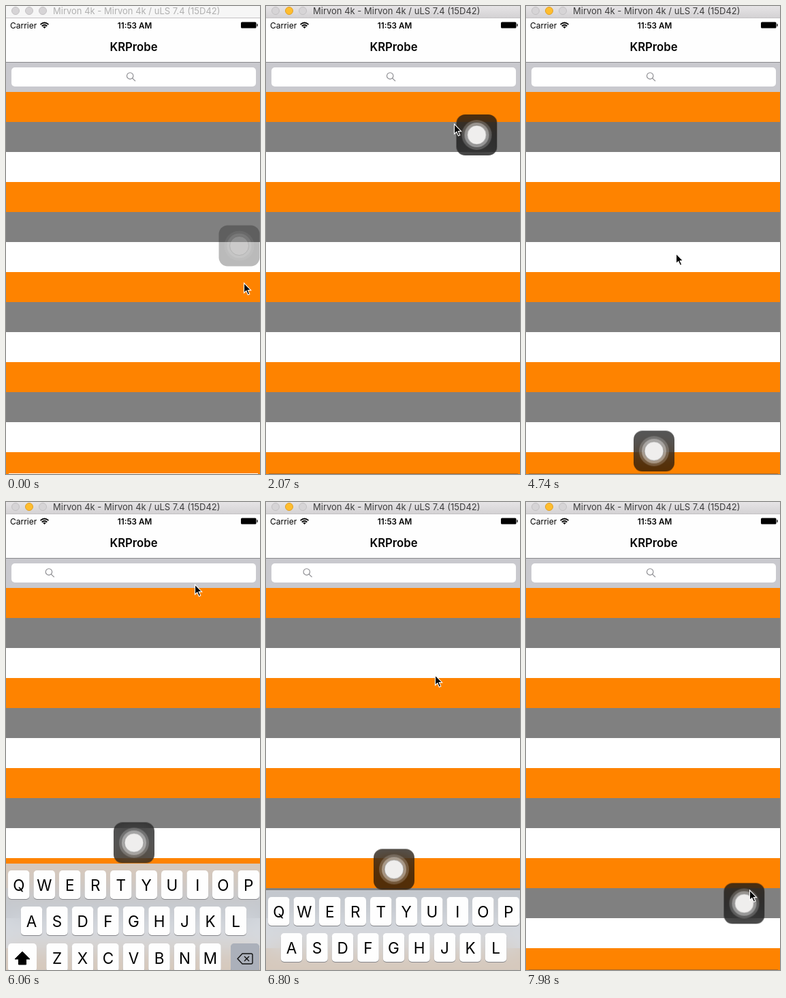
An HTML page for the animation above (8 s loop, 373 px wide and 686 px high).

```html
<!DOCTYPE html>
<html lang="en">
<head>
<meta charset="utf-8">
<title>Floating button</title>
<style>
  html, body { margin: 0; width: 100%; height: 100%; overflow: hidden; background: #fff; }
  body { position: relative; }
  svg { position: absolute; left: 0; top: 0; display: block; }
  text { font-family: Inter, Roboto, sans-serif; }
  #keyboard, #button { position: absolute; left: 0; top: 0; }
  #keyboard {
    width: 373px; height: 216px;
    background: rgba(208, 212, 219, .86);
    -webkit-backdrop-filter: blur(18px); backdrop-filter: blur(18px);
  }
  #button {
    width: 60px; height: 60px; border-radius: 13px;
    background: rgba(10, 10, 10, .69);
    -webkit-backdrop-filter: blur(14px); backdrop-filter: blur(14px);
  }
  #button.idle {
    background: rgba(10, 10, 10, .28);
    -webkit-backdrop-filter: none; backdrop-filter: none;
  }
  #button.idle svg { opacity: .32; }
</style>
</head>
<body>
<svg width="373" height="686">
  <defs>
    <linearGradient id="chrome" x2="0" y2="1">
      <stop stop-color="#e6e4e6"/><stop offset="1" stop-color="#d3d1d3"/>
    </linearGradient>
    <pattern id="stripes" width="373" height="132" y="126" patternUnits="userSpaceOnUse">
      <rect width="373" height="44" fill="#fe8300"/>
      <rect y="44" width="373" height="44" fill="#808080"/>
      <rect y="88" width="373" height="44" fill="#fff"/>
    </pattern>
  </defs>
  <rect y="126" width="373" height="560" fill="url(#stripes)"/>
  <path id="edge" d="M4 685.5H370"/>

  <rect id="titleBar" width="373" height="18"/>
  <path d="M0 17.5H373" stroke="#c4c2c4"/>
  <g stroke="#c3c1c3" fill="#d6d4d6">
    <circle cx="14" cy="7" r="5.5"/>
    <circle id="minimise" cx="34" cy="7" r="5.5"/>
    <circle cx="54" cy="7" r="5.5"/>
  </g>
  <text id="title" x="69" y="12" font-size="13">Mirvon 4k - Mirvon 4k / uLS 7.4 (15D42)</text>

  <rect y="18" width="373" height="64" fill="#fefefe"/>
  <text x="6" y="32.5" font-size="12">Carrier</text>
  <g fill="none" stroke="#000" stroke-width="1.7">
    <path d="M50.5 27.2Q56.5 21.8 62.5 27.2M52.7 29.5Q56.5 26 60.3 29.5"/>
    <path d="M54.2 30.6Q56.5 28.7 58.8 30.6L56.5 33Z" fill="#000" stroke="none"/>
  </g>
  <text x="189" y="32.5" font-size="11.7" font-weight="600" text-anchor="middle">11:53 AM</text>
  <rect x="345" y="23.5" width="22.5" height="9" rx="1.5"/>
  <path d="M369 26.3v3.5" stroke="#000" stroke-width="1.3"/>
  <text x="187.5" y="66" font-size="16.7" font-weight="600" text-anchor="middle">KRProbe</text>

  <rect y="82" width="373" height="44" fill="#c9c9ce"/>
  <path d="M0 82.5H373" stroke="#89898c"/>
  <rect x="8" y="90" width="359" height="28" rx="5" fill="#fff"/>
  <g id="lens" fill="none" stroke="#87878c" stroke-width="1.1">
    <circle cx="182.2" cy="102.4" r="4.7"/><path d="M185.6 105.8L190 110.2"/>
  </g>
  <path id="caret" d="M37 94V112" stroke="#476ae8" stroke-width="2"/>
</svg>

<div id="keyboard"><svg id="keys" width="373" height="216"></svg></div>

<div id="button"><svg width="60" height="60" fill="#fff">
  <circle cx="30" cy="30" r="22" fill-opacity=".2"/>
  <circle cx="30" cy="30" r="18" fill-opacity=".36"/>
  <circle cx="30" cy="30" r="14" fill="#efeeed" stroke="#777" stroke-width=".6"/>
</svg></div>

<svg id="pointer" width="14" height="22" overflow="visible">
  <path d="M.5 0V14.5L3.8 11.5L6.4 17.3L8.8 16.2L6.3 10.6H10.7Z" stroke="#fff" stroke-width="1.1"/>
</svg>

<script>
const $ = id => document.getElementById(id);

// Keyboard
const TAN = '#b3a896';
function key(x, row, width, label, fill = '#fefefe', size = 22.5, color = '#000') {
  const y = 10 + row * 53.7 | 0;
  return `<rect x="${x}" y="${y + 1}" width="${width}" height="42" rx="5" fill="#85868a"/>
    <rect x="${x}" y="${y}" width="${width}" height="42" rx="5" fill="${fill}"/>
    <text x="${x + width / 2}" y="${y + 21.5 + size * .36}" font-size="${size}" fill="${color}"
      text-anchor="middle">${label}</text>`;
}
const letterRow = (letters, row) => [...letters].map((letter, i) =>
  key(187.5 + (i - letters.length / 2) * 37.5 + 3, row, 31.5, letter)).join('');

$('keys').innerHTML =
  ['QWERTYUIOP', 'ASDFGHJKL', 'ZXCVBNM'].map(letterRow).join('') +
  key(3, 2, 42, '') + key(330, 2, 42, '', '#abb0ba') +
  key(3, 3, 40.5, '123', TAN, 16) + key(50, 3, 40.5, '', TAN) +
  key(96, 3, 182, 'space', '#fefefe', 16) +
  key(284, 3, 88, 'Search', '#b8afa4', 16, '#857d73') +
  `<path d="M24 129L35 140H29.5V148H18.5V140H13Z" stroke="#000" stroke-linejoin="round"/>
   <g fill="none" stroke="#111" stroke-width="1.4" stroke-linejoin="round">
     <path d="M340 139.5L347 132H360Q362 132 362 134V145Q362 147 360 147H347Z"/>
     <path d="M350 136L357 143M357 136L350 143"/>
     <circle cx="70" cy="191" r="9"/>
     <path d="M64.5 192.5H75.5Q74.5 198 70 198T64.5 192.5Z"/>
     <path d="M67 186v3.5M73 186v3.5" stroke-width="2"/>
   </g>`;

// Motion: the screen refreshes once per tick; each stop is [tick, x, y]
const LOOP = 8000, TICK = 147.7;
const pointerStops = [
  [1, 349, 406], [8, 347, 366], [9, 347, 366], [14, 276, 173], [19, 349, 8], [23, 349, 47],
  [24, 349, 47], [30, 150, 605], [32, 220, 363], [36, 276, 127], [38, 276, 127],
  [39, 277, 121], [43, 277, 121], [46, 248, 254], [51, 190, 650], [54, 328, 569]
];
const buttonStops = [
  [9, 342.5, 351.5], [14, 309.5, 189], [18, 342.5, 50.5], [24, 342.5, 50.5],
  [30, 176, 600], [31, 188, 652.5], [51, 188, 652.5], [54, 320.5, 588.5]
];

// Smooth 0 to 1 between two ticks
function ramp(tick, start, end) {
  const p = Math.min(1, Math.max(0, (tick - start) / (end - start)));
  return p * p * (3 - 2 * p);
}
function along(stops, tick) {
  let [from, x, y] = stops[0];
  for (const [to, nextX, nextY] of stops.slice(1)) {
    const p = ramp(tick, from, to);
    x += (nextX - x) * p;
    y += (nextY - y) * p;
    from = to;
  }
  return [x, y];
}

const place = (id, x, y) => $(id).style.transform = `translate(${x}px, ${y}px)`;
const show = (id, visible) => $(id).style.visibility = visible ? 'visible' : 'hidden';
const paint = (id, property, color) => $(id).setAttribute(property, color);

function draw() {
  const tick = Math.floor(performance.now() % LOOP / TICK);
  const active = tick >= 5;
  const raised = ramp(tick, 39, 42) - ramp(tick, 45, 47.17);
  const focused = ramp(tick, 39, 42) - ramp(tick, 45.3, 47.5);
  const keyboardTop = Math.round(690 - 216 * raised);
  const [x, y] = along(buttonStops, tick);

  place('pointer', ...along(pointerStops, tick));
  place('button', x - 30, Math.min(y, keyboardTop - 30.5) - 30);
  place('keyboard', 0, keyboardTop);
  place('lens', -161 * focused, 0);
  show('keyboard', raised > 0);
  show('caret', focused === 1);

  $('button').classList.toggle('idle', !active);
  paint('titleBar', 'fill', active ? 'url(#chrome)' : '#f6f6f6');
  paint('title', 'fill', active ? '#3c3c3c' : '#b0b0b0');
  paint('minimise', 'fill', active ? '#ffbd2e' : '#d6d4d6');
  paint('minimise', 'stroke', active ? '#e0a028' : '#c3c1c3');
  paint('edge', 'stroke', active ? '#b96a1c' : '#fff');
  requestAnimationFrame(draw);
}
draw();
</script>
</body>
</html>
```
